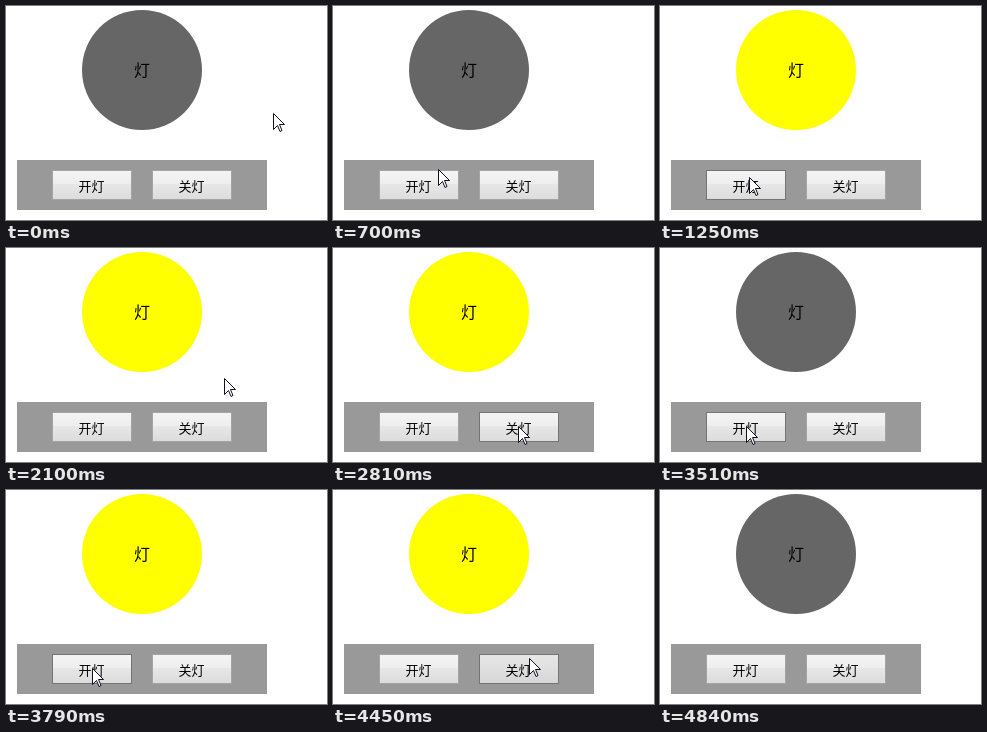
An HTML page that plays this animation: 321 px wide and 214 px high, repeating every 5.12 s.

```html
<!DOCTYPE html>
<html lang="zh-CN">
<head>
<meta charset="utf-8">
<style>
  html, body { margin: 0; width: 100%; height: 100%; overflow: hidden; background: #fff; }
  svg { display: block; }
  text { font: 300 13px "Noto Sans CJK SC", "Noto Sans CJK", sans-serif; }
  #label { font-size: 16px; }
  .button { fill: url(#face); stroke: #a4a4a4; }
  .hover { stroke: #747474; }
  .pressed { fill: url(#down); }
</style>
</head>
<body>
<svg width="321" height="214">
  <defs>
    <linearGradient id="face" x2="0" y2="1">
      <stop stop-color="#f4f4f4"/>
      <stop offset=".46" stop-color="#eee"/>
      <stop offset=".46" stop-color="#e7e7e7"/>
      <stop offset="1" stop-color="#dcdcdc"/>
    </linearGradient>
    <linearGradient id="down" x2="0" y2="1">
      <stop stop-color="#e7e7e7"/>
      <stop offset="1" stop-color="#d7d7d7"/>
    </linearGradient>
  </defs>
  <circle id="lamp" cx="136" cy="64" r="60"/>
  <text id="label" x="128" y="70">灯</text>
  <rect x="11" y="154" width="250" height="50" fill="#999"/>
  <rect class="button" x="46.5" y="164.5" width="79" height="29"/>
  <rect class="button" x="146.5" y="164.5" width="79" height="29"/>
  <text x="72.5" y="185">开灯</text>
  <text x="172.5" y="185">关灯</text>
  <path id="cursor" fill="#fff" stroke="#112" d="M.5.5V16.5L4.5 12.5 7 18.5 9 17.5 6.5 11.5H11.5Z"/>
</svg>
<script>
const LOOP = 5120;
const STEP = 138; // the pointer is redrawn once per step
const lamp = document.getElementById('lamp');
const cursor = document.getElementById('cursor');
const buttons = document.querySelectorAll('.button');

// Pointer strokes, times in steps
const strokes = [
  { from: 1.9, to: 5, x: 105, y: 163 },
  { from: 5, to: 6, x: 89, y: 171 },
  { from: 13, to: 15, x: 218, y: 130 },
  { from: 17, to: 20, x: 185, y: 178 },
  { from: 22, to: 25, x: 86, y: 178 },
  { from: 27, to: 29, x: 196, y: 168 },
  { from: 33, to: 35, x: 289, y: 214 }
];
// Clicks in ms, alternately on and off
const clicks = [
  { down: 1250, up: 1250 },
  { down: 2970, up: 2970 },
  { down: 3640, up: 3790 },
  { down: 4450, up: 4570 }
];

const easeOut = u => Math.sin(Math.min(Math.max(u, 0), 1) * Math.PI / 2);

function pointerAt(step) {
  let x = 267, y = 107;
  for (const s of strokes) {
    const u = easeOut((step - s.from) / (s.to - s.from));
    x += (s.x - x) * u;
    y += (s.y - y) * u;
  }
  return [Math.round(x), Math.round(y)];
}

function isOver(button, x, y) {
  const { left, right, top, bottom } = button.getBoundingClientRect();
  return x >= left && x < right && y >= top && y < bottom;
}

function draw(t) {
  const [x, y] = pointerAt(Math.floor(t / STEP));
  const lit = clicks.filter(c => c.up <= t).length % 2;
  const held = clicks.some(c => c.down <= t && t < c.up);
  cursor.setAttribute('transform', `translate(${x} ${y})`);
  lamp.setAttribute('fill', lit ? '#ff0' : '#666');
  for (const button of buttons) {
    const over = isOver(button, x, y);
    button.classList.toggle('hover', over);
    button.classList.toggle('pressed', over && held);
  }
}

const start = performance.now();
function tick() {
  draw((performance.now() - start) % LOOP);
  requestAnimationFrame(tick);
}
tick();
</script>
</body>
</html>
```
